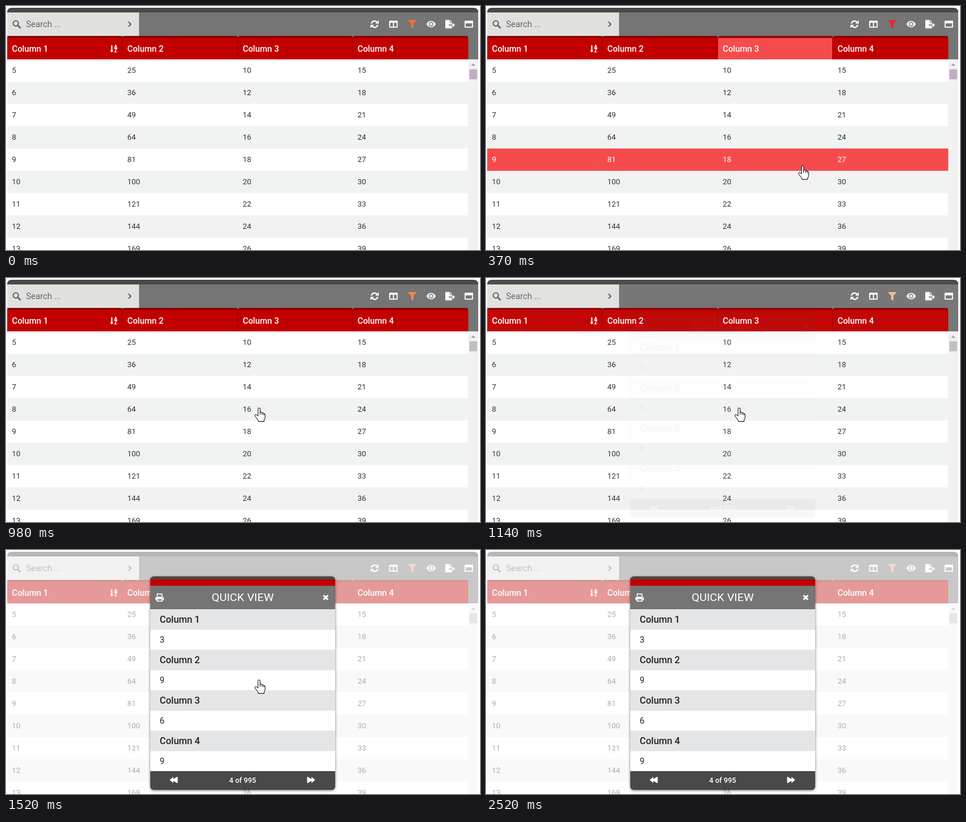
Write an HTML page that moves like this. It is 805 by 416 pixels and loops after 2670 ms.

```html
<!DOCTYPE html>
<html lang="en">
<head>
<meta charset="utf-8">
<title>Table quick view</title>
<style>
  html, body { margin: 0; width: 100%; height: 100%; overflow: hidden; background: #fff; }
  svg { display: block; font-family: Roboto, Arial, sans-serif; }
  .cell { font-size: 13px; fill: #333; }
  .head { font-size: 14.4px; font-weight: 500; fill: #fff; }
  .label { font-size: 16px; font-weight: 500; fill: #222; }
  .value { font-size: 14.4px; fill: #222; }
  .hover .cell { fill: #fff; }
  .row.hover rect, .col.hover .face { fill: #f64b4c; }
</style>
</head>
<body>
<svg id="stage" width="805" height="416" viewBox="0 0 805 416"></svg>
<script>
const RED = '#c20000', DARK = '#484948', GREY = '#757575';
const COL_X = [2, 198, 394, 589, 785], ROW_Y = 91, ROW_H = 38;

const rect = (x, y, w, h, fill, extra = '') =>
  `<rect x="${x}" y="${y}" width="${w}" height="${h}" fill="${fill}" ${extra}/>`;
const text = (x, y, s, cls, extra = '') => `<text x="${x}" y="${y}" class="${cls}" ${extra}>${s}</text>`;
const path = (d, extra = '') => `<path d="${d}" ${extra}/>`;
const icon = (x, y, body, fill = '#fff') =>
  `<g transform="translate(${x} ${y})" fill="${fill}" fill-rule="evenodd">${body}</g>`;
const range = (n, f) => Array.from({ length: n }, (_, i) => f(i)).join('');

const syncHalf = path('M-5.4-1A5.5 5.5 0 0 1 4-3.6', 'fill="none" stroke="#fff" stroke-width="2.2"') +
  path('M7-6.8V-1H1.2Z');
const skip = path('M-7 0L-.8-5.2V-1.4L5.2-5.2Q6.6-5.6 6.6-4.4V4.4Q6.6 5.6 5.2 5.2L-.8 1.4V5.2Z');
const ICONS = {
  search: '<circle cx="-1.4" cy="-1.4" r="4.4" fill="none" stroke="#666" stroke-width="2"/>' +
    path('M2 2L6 6', 'stroke="#666" stroke-width="2.6" stroke-linecap="round"'),
  chevron: path('M-2-4L2 0L-2 4', 'fill="none" stroke="#666" stroke-width="2.2"'),
  sync: syncHalf + `<g transform="rotate(180)">${syncHalf}</g>`,
  columns: path('M-6-6H6Q7.2-6 7.2-4.8V4.8Q7.2 6 6 6H-6Q-7.2 6-7.2 4.8V-4.8Q-7.2-6-6-6ZM-5.4-2.6V4.2H-.9V-2.6ZM.9-2.6V4.2H5.4V-2.6Z'),
  filter: path('M-6.6-7H6.6Q7.6-6.6 6.9-5.7L2-.8V6.4Q1.6 7.4.6 6.9L-1.6 5.3Q-2 5-2 4.6V-.8L-6.9-5.7Q-7.6-6.6-6.6-7Z'),
  eye: path('M-8 0Q-5-5.4 0-5.4Q5-5.4 8 0Q5 5.4 0 5.4Q-5 5.4-8 0ZM-3.9 0A3.9 3.9 0 0 0 3.9 0A3.9 3.9 0 0 0-3.9 0Z') +
    '<circle r="2.5"/>',
  exporter: path('M-7.2-7.2H-.6V-2.8H3.4V.4H-2V2.6H3.4V7.2H-7.2Q-8 7.2-8 6.4V-6.4Q-8-7.2-7.2-7.2Z') +
    path('M.4-7.2L3.4-3.8H.4Z') + path('M3.4.4H4.8V-2.2L8.6 1.5L4.8 5.2V2.6H3.4Z'),
  windowBox: path('M-6-6H6Q7.2-6 7.2-4.8V4.8Q7.2 6 6 6H-6Q-7.2 6-7.2 4.8V-4.8Q-7.2-6-6-6ZM-5.4-1.4V4.2H5.4V-1.4Z'),
  sort: path('M-4.4-6H-2.4V2.6H-.4L-3.4 6.2L-6.4 2.6H-4.4Z') +
    `<g font-size="8.5" font-weight="900">${text(.6, -.2, 'A', '')}${text(.8, 6.4, 'Z', '')}</g>`,
  print: path('M-5-7H3L5-5V-1.6H-5ZM-3.4-5.4V-1H3.4V-4.4H1.6V-5.4Z') +
    path('M-5.6-1H5.6Q7.2-1 7.2.6V4.4H5V7H-5V4.4H-7.2V.6Q-7.2-1-5.6-1ZM-3.4 3V5.4H3.4V3ZM4.6.6V2H6V.6Z'),
  close: path('M-3.8-3.8L3.8 3.8M3.8-3.8L-3.8 3.8', 'stroke="#fff" stroke-width="2.8"'),
  back: skip,
  forward: `<g transform="scale(-1 1)">${skip}</g>`
};

const rows = range(9, i => {
  const n = i + 5, y = ROW_Y + i * ROW_H;
  return `<g class="row">${rect(2, y, 783, ROW_H, i % 2 ? '#f1f2f2' : '#fff')}` +
    [n, n * n, n * 2, n * 3].map((v, c) => text(COL_X[c] + 8, y + 23, v, 'cell')).join('') + '</g>';
});
const heads = range(4, i => {
  const x = COL_X[i], w = COL_X[i + 1] - x;
  return `<g class="col">${rect(x, 51, w, 40, '#8a0000', 'rx="4"')}` +
    rect(x, 55, w, 36, '#980000') + rect(x, 54.5, w - 1, 36.5, RED, 'class="face"') +
    text(x + 8, 78, 'Column ' + (i + 1), 'head') + '</g>';
});
const tools = ['sync', 'columns', 'filter', 'eye', 'exporter', 'windowBox'].map((name, i) =>
  `<g id="${name}">${icon(626 + 32 * i, 31, ICONS[name], name == 'filter' ? 'inherit' : '#fff')}</g>`).join('');

const fields = range(4, i => {
  const y = 101 + i * 69;
  return rect(245, y, 314, 35, '#e4e5e7') + text(261, y + 23, 'Column ' + (i + 1), 'label') +
    text(261, y + 57, [3, 9, 6, 9][i], 'value');
});
const dialog = rect(245, 45, 314, 364, DARK, 'rx="6" style="filter:drop-shadow(0 1px 2px #0008)"') +
  rect(245, 50, 314, 11, RED) + rect(245, 61, 314, 40, GREY) + rect(245, 101, 314, 276, '#fff') + fields +
  text(402, 87, 'QUICK VIEW', '', 'font-size="19.2" fill="#fff" text-anchor="middle"') +
  text(402, 397, '4 of 995', '', 'font-size="12.4" font-weight="500" fill="#fff" text-anchor="middle"') +
  icon(261, 81, ICONS.print) + icon(543, 81, ICONS.close) +
  icon(285, 392, ICONS.back) + icon(518, 392, ICONS.forward);

const hand = path('M-2 1.8Q-2 .5-.2 .5Q1.6 .5 1.6 2V8Q4.4 6.6 5 9Q7.4 7.8 7.9 10.2Q10 9.8 10 12V16.5Q10 19 8.3 21V23.6H-1.6V21.6L-7 14.6Q-8 12.4-6.2 11.8Q-4.6 11.6-2 14.4Z') +
  path('M1.6 8V12M5 9V12.4M7.9 10.2V13', 'fill="none"');
const arrow = path('M.5 .5V16.6L4 13.2L6.4 19L9 17.9L6.6 12.2H11.4Z');

const stage = document.getElementById('stage');
stage.innerHTML =
  path('M2 51V11Q2 3 10 3H794Q802 3 802 11V51Z', `fill="${DARK}"`) +
  rect(2, 11, 800, 80, GREY) + rect(2, 11, 224, 40, '#e0e0df') +
  icon(18, 31, ICONS.search) + icon(210, 31, ICONS.chevron) +
  text(34, 36, 'Search ...', '', 'font-size="14.4" fill="#666"') +
  tools + heads + icon(183, 73, ICONS.sort) + rows +
  rect(785, 91, 17, 325, '#f1f1f1') + path('M789.5 102L793.5 98L797.5 102Z', 'fill="#a3a3a3"') +
  rect(787, 108, 13, 17, '#bfadc4', 'id="thumb"') +
  rect(0, 0, 805, 416, '#fff', 'id="veil"') + `<g id="dialog">${dialog}</g>` +
  `<g id="cursor" fill="#fff" stroke="#000" stroke-linejoin="round"><g id="hand">${hand}</g><g id="arrow">${arrow}</g></g>`;

const $ = id => document.getElementById(id);
const rowEls = stage.querySelectorAll('.row'), colEls = stage.querySelectorAll('.col');

// Keys are [step, ...values]; values are linear between them.
const CURSOR = [[1, 681, 372], [3, 612, 310], [7, 464, 234], [8, 452, 229], [11, 430, 221],
  [23, 430, 221], [24, 446, 236], [27, 585, 378], [30, 640, 420]];
const FUNNEL = [[0, 238, 112, 50], [2, 238, 40, 40], [8, 238, 40, 40], [11, 240, 110, 60], [12, 240, 110, 60],
  [15, 245, 181, 142], [19, 245, 181, 142], [20, 245, 150, 120], [23, 245, 150, 120],
  [27, 255, 20, 15], [30, 250, 60, 50], [32, 250, 60, 50], [33, 245, 152, 135]];
const FADE = [[13, 0], [14, .015], [15, .04], [16, .48], [17, .88], [18, .97], [19, 1]];

function at(keys, k) {
  const j = keys.findIndex(key => key[0] >= k);
  if (j < 0) return keys[keys.length - 1].slice(1);
  if (j == 0) return keys[0].slice(1);
  const a = keys[j - 1], b = keys[j], p = (k - a[0]) / (b[0] - a[0]);
  return a.slice(1).map((v, i) => v + (b[i + 1] - v) * p);
}

function draw(now) {
  const t = now % 2670;
  const k = t < 70 ? 0 : Math.min(33, Math.floor((t + 21) / 77));
  const [x, y] = at(CURSOR, k), [fade] = at(FADE, k);
  const hovering = k > 0 && k < 13, moved = k > 23;

  rowEls.forEach((el, i) => el.classList.toggle('hover', hovering && Math.floor((y - ROW_Y) / ROW_H) == i));
  colEls.forEach((el, i) => el.classList.toggle('hover', hovering && x >= COL_X[i] && x < COL_X[i + 1]));
  $('filter').setAttribute('fill', `rgb(${at(FUNNEL, k).map(Math.round)})`);
  $('thumb').setAttribute('fill', k < 13 ? '#bfadc4' : '#bcc0c4');
  $('veil').setAttribute('opacity', fade * .6);
  $('dialog').setAttribute('opacity', fade);
  $('cursor').setAttribute('transform', `translate(${Math.round(x)} ${Math.round(y)})`);
  $('cursor').style.display = k > 0 && k < 30 ? '' : 'none';
  $('hand').style.display = moved ? 'none' : '';
  $('arrow').style.display = moved ? '' : 'none';
}

const start = performance.now();
function tick() {
  draw(performance.now() - start);
  requestAnimationFrame(tick);
}
tick();
</script>
</body>
</html>
```
